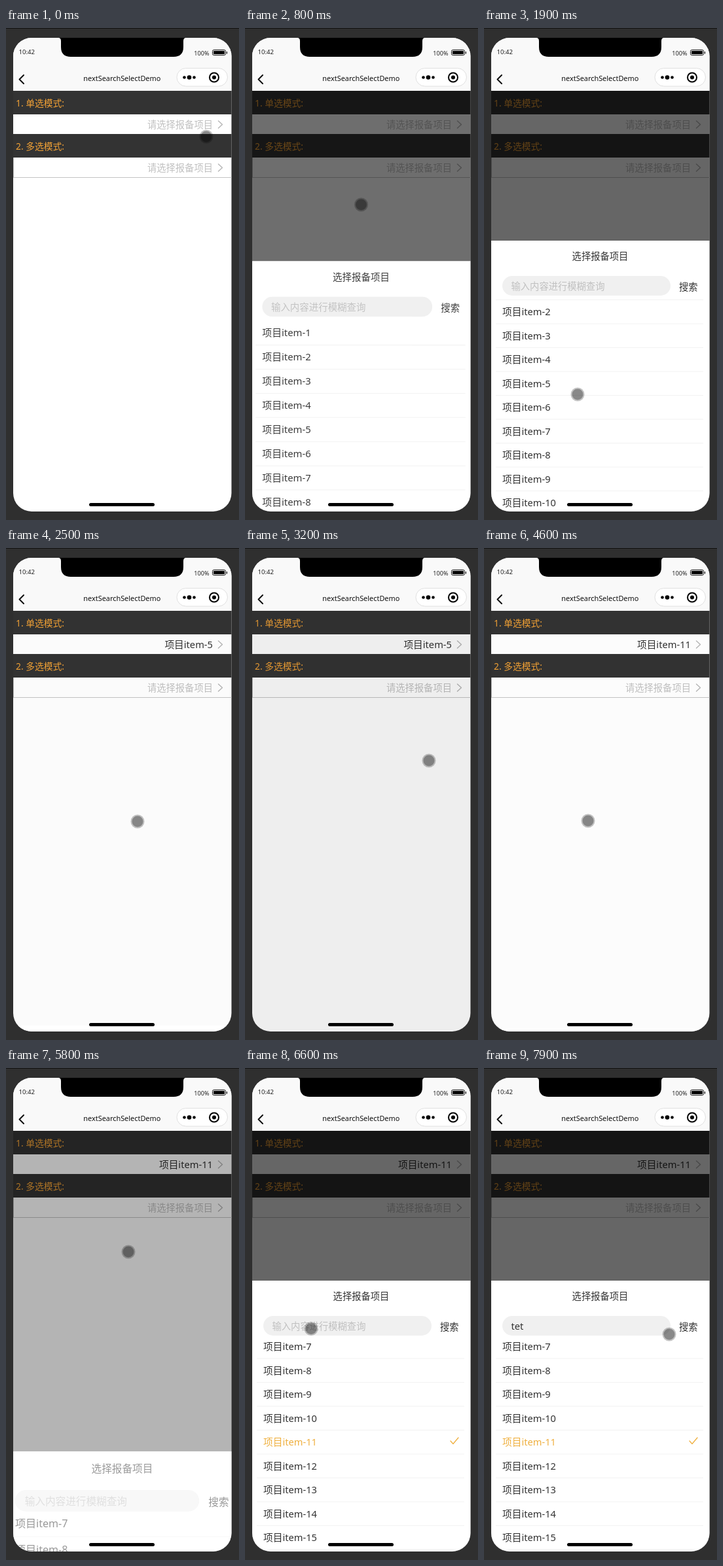
Recreate the animation shown at these times as an HTML page. Size 356 px wide and 752 px high, loop 8 s.

```html
<!DOCTYPE html>
<html lang="zh-CN">
<head>
<meta charset="utf-8">
<title>nextSearchSelectDemo</title>
<style>
  html, body { margin: 0; width: 100%; height: 100%; overflow: hidden; background: #2f2f2f; }
  svg { display: block; width: 356px; height: 752px; }
  text { font: 14.3px "Noto Sans", "Noto Sans CJK SC", "Noto Sans CJK", sans-serif; fill: #333; }
  .small { font-size: 9.6px; fill: #222; }
  .nav { font-size: 10.9px; fill: #111; }
  .label { font-size: 13.8px; fill: #f5a335; }
  .hint { fill: #c0c0c0; }
  .item, .typed { font-size: 14.7px; }
  .on { fill: #efb040; }
  .end { text-anchor: end; }
  .mid { text-anchor: middle; }
  .line { fill: none; stroke-linecap: round; stroke-linejoin: round; }
</style>
</head>
<body>
<svg viewBox="0 0 356 752">
  <defs>
    <clipPath id="screen"><rect x="11" y="15" width="333.5" height="724" rx="28"/></clipPath>
    <clipPath id="listBox"><rect x="0" y="413" width="356" height="340"/></clipPath>
  </defs>
  <rect width="356" height="752" fill="#2f2f2f"/>
  <rect width="356" height="1" fill="#111"/>

  <g clip-path="url(#screen)">
    <rect x="11" y="15" width="334" height="724" fill="#fff"/>

    <!-- form -->
    <rect x="11" y="96" width="334" height="36" fill="#333"/>
    <rect x="11" y="162" width="334" height="36" fill="#333"/>
    <path d="M11 228.5H345M11.5 198V228" stroke="#c4c4c4" fill="none"/>
    <text class="label" x="15" y="119.5">1. 单选模式:</text>
    <text class="label" x="15" y="185.5">2. 多选模式:</text>
    <text class="end" id="value" x="316" y="153"></text>
    <text class="end hint" x="316" y="219">请选择报备项目</text>
    <path class="line" d="M324.5 142l6 5.5l-6 5.5M324.5 208l6 5.5l-6 5.5" stroke="#b8b8b8" stroke-width="1.5"/>

    <rect id="mask" x="11" y="96" width="334" height="644"/>

    <!-- popup -->
    <g id="panel">
      <rect x="11" y="325" width="334" height="430" fill="#fff"/>
      <g id="content">
        <text class="mid" x="177.5" y="354">选择报备项目</text>
        <rect x="28" y="379" width="257" height="30" rx="15" fill="#f0f0f0"/>
        <text id="query" x="41.5" y="400"></text>
        <text x="298" y="400.5">搜索</text>
        <g clip-path="url(#listBox)"><g id="list"></g></g>
      </g>
    </g>

    <!-- status and navigation bars -->
    <rect x="11" y="15" width="334" height="81" fill="#f9f9f9"/>
    <path d="M80 15H275Q271 15 271 20V29Q271 44 256 44H99Q84 44 84 29V20Q84 15 80 15Z"/>
    <text class="small" x="19.5" y="40">10:42</text>
    <text class="small end" x="310.5" y="41.5" style="font-size:9.1px">100%</text>
    <rect x="315.5" y="33.5" width="20" height="8" rx="2" fill="none" stroke="#111"/>
    <path d="M317 35H334V40H317ZM337 36H338V39.5H337Z"/>
    <path class="line" d="M27 72L20.5 78.5L27 85" stroke="#111" stroke-width="2"/>
    <text class="nav mid" x="177.3" y="81.3">nextSearchSelectDemo</text>
    <rect x="261" y="61.5" width="77.5" height="27.5" rx="13.75" fill="#fff" stroke="#e0e0e0"/>
    <circle cx="272.5" cy="75.5" r="2.3"/>
    <circle cx="280" cy="75.5" r="3.3"/>
    <circle cx="287.5" cy="75.5" r="2.3"/>
    <circle cx="318" cy="75.5" r="7" fill="none" stroke="#000" stroke-width="2"/>
    <circle cx="318" cy="75.5" r="3"/>

    <rect x="127" y="726" width="100" height="5" rx="2.5"/>
    <g id="pointer">
      <circle r="10.5" fill-opacity=".23"/>
      <circle r="8.5" fill-opacity=".3"/>
    </g>
  </g>
</svg>
<script>
const LOOP = 8000, STEP = 100, ROW = 36.5, PANEL = 415, FADE = 300;
const HINT = '请选择报备项目', SEARCH_HINT = '输入内容进行模糊查询';

// [mask start, panel start, open?]
const toggles = [[585, 600, 1], [2260, 2260, 0], [3167, 3200, 1], [4350, 4345, 0], [5713, 5730, 1]];
const choices = [[0, 0], [2300, 5], [4400, 11]];
const typing = [[0, ''], [7000, 't'], [7300, 'te'], [7500, 'tet']];
const scrollKeys = [[1400, 0], [1800, ROW], [3500, ROW], [3700, 150], [4000, 227]];
const pointerKeys = [
  [0, 306, 166], [200, 199, 83], [600, 195, 120], [1000, 160, 420], [1500, 153, 620],
  [1900, 143, 560], [2100, 143, 552], [2300, 143, 552], [2900, 317, 150], [3100, 317, 150],
  [3200, 281, 325], [3500, 150, 630], [4000, 128, 565], [4100, 125, 575], [4300, 125, 575],
  [4600, 159, 417], [5200, 317, 150], [5400, 317, 150], [5500, 317, 151], [5600, 317, 151],
  [5800, 187, 281], [6300, 96, 397], [6500, 96, 397], [6700, 106, 400], [7200, 106, 400],
  [7500, 270, 428], [7600, 270, 428], [7900, 283, 407]
];

const $ = id => document.getElementById(id);
const [mask, panel, content, list, query, value, pointer] =
  ['mask', 'panel', 'content', 'list', 'query', 'value', 'pointer'].map($);

const rowMarkup = n => {
  const y = 434 + (n - 1) * ROW;
  return `<g><path d="M18 ${y + 18}H335" stroke="#f2f2f2"/>
    <text class="item" x="28" y="${y + 5}">项目item-${n}</text>
    <path class="line" d="M314 ${y - 2}l4 4.5l8 -9.5" stroke="#efb040" stroke-width="1.3"/></g>`;
};
list.innerHTML = Array.from({ length: 22 }, (_, i) => rowMarkup(i + 1)).join('');
const rows = [...list.children];

// CSS "ease", cubic-bezier(.25, .1, .25, 1)
function ease(x) {
  if (x <= 0) return 0;
  if (x >= 1) return 1;
  let lo = 0, hi = 1, s;
  for (let i = 0; i < 24; i++) {
    s = (lo + hi) / 2;
    if (0.75 * s * (1 - s) + s ** 3 < x) lo = s; else hi = s;
  }
  return 0.3 * s * (1 - s) ** 2 + 3 * s * s * (1 - s) + s ** 3;
}

function openness(t, col) {
  let v = 0;
  for (const k of toggles) v += (k[2] - v) * ease((t - k[col]) / FADE);
  return v;
}

const latest = (keys, t) => keys.filter(k => k[0] <= t).pop()[1];

function tween(keys, t, col) {
  const i = keys.findIndex(k => k[0] > t);
  if (i < 0) return keys[keys.length - 1][col];
  if (i === 0) return keys[0][col];
  const a = keys[i - 1], b = keys[i];
  return a[col] + (b[col] - a[col]) * (t - a[0]) / (b[0] - a[0]);
}

function draw(t) {
  const shade = openness(t, 0), rise = openness(t, 1);
  mask.setAttribute('fill-opacity', 0.6 * shade);
  panel.setAttribute('transform',
    `translate(177.5 ${325 + PANEL * (1 - rise)}) scale(${1 + 0.15 * (1 - rise)}) translate(-177.5 -325)`);
  content.setAttribute('opacity', shade);
  list.setAttribute('transform', `translate(0 ${-tween(scrollKeys, t, 1)})`);

  const chosen = latest(choices, t);
  value.textContent = chosen ? '项目item-' + chosen : HINT;
  value.setAttribute('class', chosen ? 'end item' : 'end hint');
  rows.forEach((row, i) => {
    const on = i + 1 === chosen;
    row.children[1].classList.toggle('on', on);
    row.children[2].style.display = on ? '' : 'none';
  });

  const text = latest(typing, t);
  query.textContent = text || SEARCH_HINT;
  query.setAttribute('class', text ? 'typed' : 'hint');

  pointer.setAttribute('transform', `translate(${tween(pointerKeys, t, 1)} ${tween(pointerKeys, t, 2)})`);
  pointer.style.display = t >= 300 && t < 600 ? 'none' : '';
}

const start = performance.now();
function tick() {
  const t = (performance.now() - start + 20) % LOOP;
  draw(Math.floor(t / STEP) * STEP);
  requestAnimationFrame(tick);
}
tick();
</script>
</body>
</html>
```
